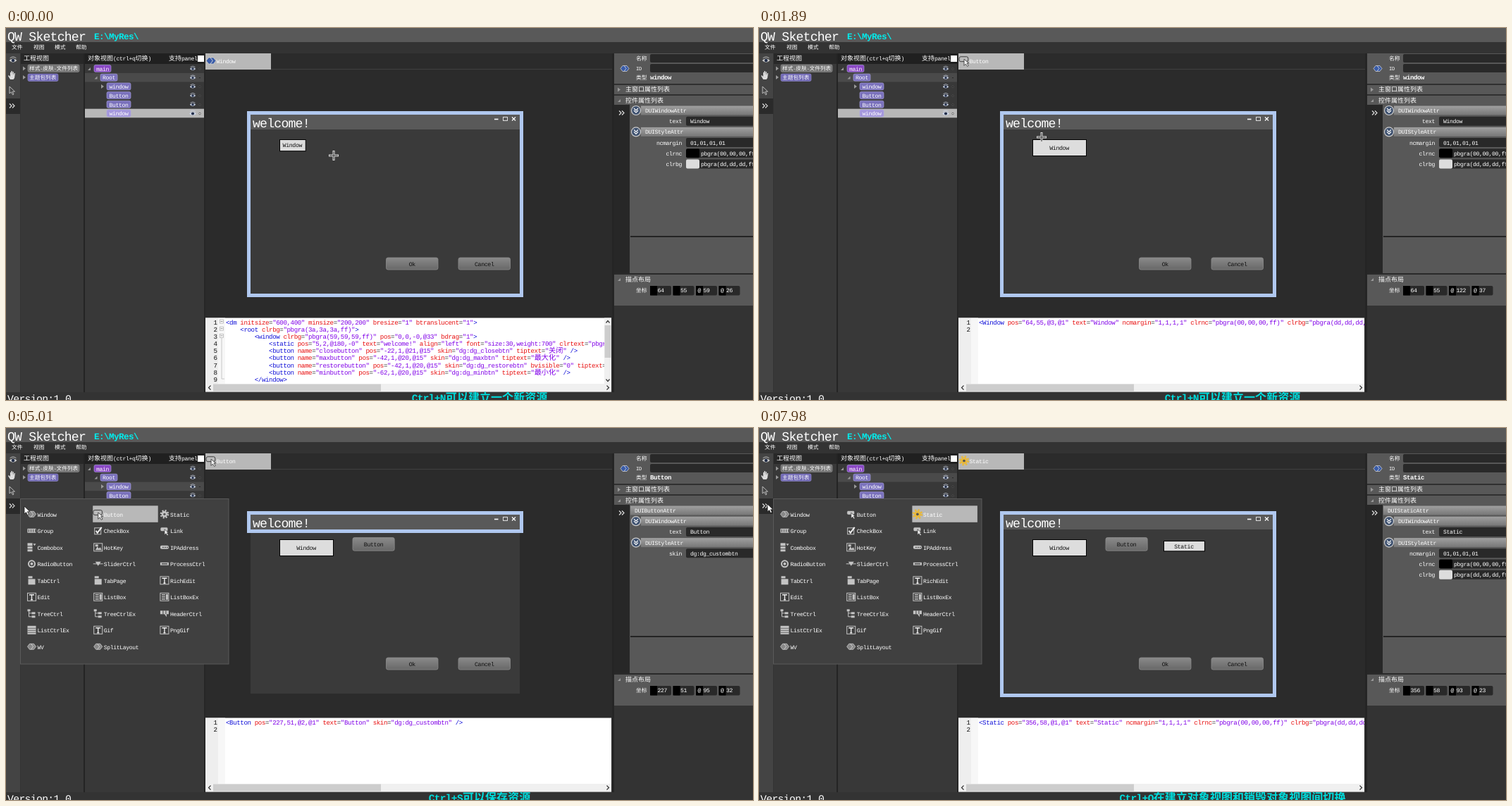
An HTML page for the animation above (8 s loop, 1060x528 px).

```html
<!DOCTYPE html>
<html lang="zh">
<head>
<meta charset="utf-8">
<title>UI designer</title>
<style>
html, body { margin: 0; width: 100%; height: 100%; overflow: hidden; background: #333; }
svg { display: block; }
text {
  font-family: "Liberation Mono", "Noto Sans CJK SC", "Noto Sans CJK", monospace;
  white-space: pre;
  text-rendering: geometricPrecision;
}
</style>
</head>
<body>
<svg id="stage" width="1060" height="528" viewBox="0 0 1060 528">
  <defs>
    <linearGradient id="btn" x2="0" y2="1"><stop stop-color="#8a8a8a"/><stop offset="1" stop-color="#686868"/></linearGradient>
    <linearGradient id="bar" x2="0" y2="1"><stop stop-color="#a0a0a0"/><stop offset="1" stop-color="#777"/></linearGradient>
    <clipPath id="wide"><path d="M283 411H859V505H283z"/></clipPath>
    <clipPath id="slim"><path d="M283 411H849V505H283z"/></clipPath>
  </defs>
  <g id="base"></g>
  <g id="live"></g>
</svg>
<script>
const LOOP = 8000, UNIT = 1.605;

// ---------- drawing helpers ----------
const esc = s => s.replace(/&/g, '&amp;').replace(/</g, '&lt;');
const rect = (x, y, w, h, fill, more = '') =>
  `<rect x="${x}" y="${y}" width="${w}" height="${h}" fill="${fill}" ${more}/>`;
const path = (d, fill, more = '') => `<path d="${d}" fill="${fill}" ${more}/>`;
const line = (d, color, w = 1) => path(d, 'none', `stroke="${color}" stroke-width="${w}"`);
const at = (x, y, body, k = 1) => `<g transform="translate(${x} ${y}) scale(${k})">${body}</g>`;

// u is the width of a half-width cell; CJK glyphs fill two cells
const runs = (s, u, fill) => s.match(/[\u2e80-\uffff]+|[^\u2e80-\uffff]+/g).map(r =>
  r > '\u2e80'
    ? `<tspan font-size="${2 * u}" fill="${fill}">${r}</tspan>`
    : `<tspan font-size="${1.8 * u}" letter-spacing="${-0.08 * u}" fill="${fill}">${esc(r)}</tspan>`).join('');
const text = (x, y, s, u = 4.5, fill = '#fff', more = '') =>
  `<text x="${x}" y="${y + 0.66 * u}" ${more}>${runs(s, u, fill)}</text>`;
const mid = 'text-anchor="middle"', end = 'text-anchor="end"', bold = 'font-weight="bold"';

const field = (x, y, w, s = '', h = 13) =>
  rect(x, y - h / 2, w, h, '#292929', 'rx="2"') + (s ? text(x + 6, y, s) : '');

// ---------- icons, each centred on 0,0 ----------
const box = c => rect(-6, -5.5, 12, 11, 'none', `stroke="${c}"`);
const icons = {
  hex: c => path('M-6 0l3-4h6l3 4l-3 4h-6z', c, 'stroke="#ccc" stroke-width=".8"') + line('M-1-4l3 4l-3 4', '#ddd', .8),
  btn: c => rect(-6, -5, 11, 6, c, 'rx="2" stroke="#333" stroke-width=".8"') + path('M0-2v8l2-2l2 3l1.5-1l-2-3h2.500z', '#eee', 'stroke="#333" stroke-width=".7"'),
  gear: c => `<circle r="5" fill="none" stroke="${c}" stroke-width="2.6" stroke-dasharray="2 1.93"/><circle r="4.2" fill="${c}"/><circle r="1.6" fill="#555"/>`,
  group: c => rect(-6, -3, 12, 6, c) + line('M-4-2v4M-1-2v4M2-2v4M5-2v4', '#444'),
  check: c => rect(-5, -4, 9, 9, 'none', `stroke="${c}"`) + line('M-3 0l2 3l6-8', '#eee', 2),
  combo: c => rect(-6, -6, 7, 4, c) + rect(-6, -1, 7, 3, c) + rect(-6, 3, 7, 3, c) + path('M2-5h4l-2 3z', c),
  key: c => box(c) + path('M-4 4l3-5l2 3l2-2l2 4z', c) + rect(-4, -4, 4, 3, c),
  ip: c => rect(-6, -2.500, 12, 5, c, 'rx="2"') + line('M-3 0h2M0 0h2M3 0h2', '#333'),
  radio: c => `<circle r="4.500" fill="none" stroke="${c}" stroke-width="2"/><circle r="2" fill="${c}"/>`,
  slider: c => line('M-7 0h14', c) + path('M-4-3h8l-4 6z', c),
  proc: c => rect(-6, -2, 12, 4, c) + rect(-4, -.7, 8, 1.4, '#444'),
  tab: c => rect(-5, -6, 6, 3, c) + rect(-5, -2, 10, 8, c),
  edit: c => box(c) + line('M-3.500-3h7M0-3v7M-1.500 4h3', '#eee', 1.4),
  list: c => box(c) + line('M-4-3h5M-4 0h5M-4 3h5', c, 1.4) + rect(2, -4, 3, 8, c),
  tree: c => rect(-6, -6, 4, 3, c) + rect(0, -2, 5, 3, c) + rect(0, 3, 5, 3, c) + line('M-4-3v7.500h4M-4-.5h4', c),
  head: c => path('M-6-4h12v5h-3v4l-3-4h-6z', c) + line('M-2-4v5M2-4v5', '#444'),
  rows: c => rect(-6, -6, 12, 12, c) + line('M-6-2.500h12M-6 .5h12M-6 3.500h12', '#555', .8)
};
const eye = c => path('M-5 0Q0-5 5 0Q0 5-5 0z', c) + '<circle r="2.100" fill="#25304a"/>' + line('M-4-3Q0-6 4-3', c, .8);
const arrow = path('M0 0v11l2.500-2.400l1.900 4l2-1l-1.900-3.800h3.500z', '#fff', 'stroke="#111" stroke-width=".7"');
const cross = line('M-7 0H7M0-7V7', '#ddd', 3) + line('M-6 0H6M0-6V6', '#333');
const right = (x, y) => path(`M${x - 2} ${y - 3}l4 3l-4 3z`, '#999');
const open = (x, y) => path(`M${x + 2} ${y - 2}v4h-4z`, '#999');
const more = (x, y) => line(`M${x - 3} ${y - 3}l3 3l-3 3m4-6l3 3l-3 3`, '#ddd', 1.2);

const palette = ('Window:hex Button:btn Static:gear Group:group CheckBox:check Link:btn Combobox:combo HotKey:key ' +
  'IPAddress:ip RadioButton:radio SliderCtrl:slider ProcessCtrl:proc TabCtrl:tab TabPage:tab RichEdit:edit Edit:edit ' +
  'ListBox:list ListBoxEx:list TreeCtrl:tree TreeCtrlEx:tree HeaderCtrl:head ListCtrlEx:rows Gif:edit PngGif:edit ' +
  'WV:hex SplitLayout:hex').split(' ').map(s => s.split(':'));
const tools = { Window: ['hex', '#3a5ca8'], Button: ['btn', '#bbb'], Static: ['gear', '#e8b93c'] };

// ---------- fixed parts ----------
function base() {
  const menu = ['文件', '视图', '模式', '帮助'].map((s, i) => text([8, 39, 69, 99][i], 27.5, s, 3.9)).join('');
  return rect(0, 0, 1060, 528, '#333') + rect(0, 0, 1060, 20, '#595959') +
    text(2, 11, 'QW Sketcher', 10.1) + text(125, 11, 'E:\\MyRes\\', 7, '#0ee', bold) + menu +
    // tool strip
    rect(0, 36, 20, 481, '#444') + rect(0, 100, 20, 22, '#2a2a2a') + at(10, 46, eye('#ccc'), 1.1) +
    at(9, 67, path('M-3 6l-3-5l1-1l2 2v-6h1.300v4v-6h1.500v6l.7-5h1.300v5l1-3h1.200l-1 7l-1.500 2z', '#ddd')) +
    at(5, 83, path('M0 0v10l2.500-2.200l2 4l1.500-.8l-1.800-3.800h3.300z', 'none', 'stroke="#bbb"')) + more(8, 110.500) +
    // project view
    rect(21, 36, 89, 481, '#383838') + rect(21, 36, 89, 15, '#282828') + text(25, 43.5, '工程视图') +
    rect(110, 36, 2, 481, '#242424') +
    right(26, 57.5) + rect(31, 52, 73, 10.500, '#747474', 'rx="2" stroke="#999" stroke-width=".6"') + text(33, 57.5, '样式-皮肤-文件列表', 3.85) +
    right(26, 70) + rect(31, 65, 43, 10.500, '#6f67b4', 'rx="2" stroke="#9a94d0" stroke-width=".6"') + text(33, 70, '主题包列表', 3.85) +
    // object view
    rect(112, 36, 169, 481, '#383838') + rect(112, 36, 169, 15, '#202020') + text(116, 43.5, '对象视图(ctrl+q切换)') +
    text(231, 43.5, '支持panel') + rect(272, 39, 9, 9, '#fff') +
    // canvas, code frame
    rect(281, 36, 2, 481, '#262626') + rect(283, 36, 577, 375, '#2b2b2b') + rect(376, 58, 484, 1, '#404040') +
    rect(283, 36, 93, 23, '#b8b8b8') +
    rect(283, 411.500, 576, 105, '#fff') + rect(283, 411.500, 18, 94, '#eee') + rect(301, 411.500, 10, 94, '#f7f7f7') +
    rect(283, 505, 576, 11, '#f0f0f0') + rect(294, 505.500, 238, 10, '#cdcdcd') +
    line('M290.500 507.500l-3 3l3 3M852.500 507.500l3 3l-3 3', '#333', 1.2) +
    // property panel
    rect(860, 36, 3, 481, '#252525') + rect(863, 36, 197, 43, '#585858') + at(878, 57.5, icons.hex('#3a5ca8')) +
    text(894, 43, '名称', 3.9) + text(894, 57, 'ID', 4) + text(894, 70, '类型', 3.9) +
    field(914, 43, 150, '', 12) + field(914, 57, 150, '', 12) +
    rect(863, 79, 197, 2, '#303030') + rect(863, 81, 197, 13, '#585858') + right(870, 87.5) + text(879, 87.5, '主窗口属性列表') +
    rect(863, 94, 197, 2, '#303030') + rect(863, 96, 197, 252, '#585858') + open(870, 103) + text(879, 103, '控件属性列表') +
    rect(863, 109, 22, 239, '#272727') + more(873, 120.500) + rect(886, 295, 174, 2, '#242424') +
    rect(863, 348, 197, 2, '#2a2a2a') + rect(863, 350, 197, 44, '#585858') + open(870, 357) + text(879, 357, '描点布局') +
    text(894, 372.5, '坐标', 3.9) +
    text(2, 525.5, 'Version:1.0', 8.2);
}

// ---------- code editor ----------
const tint = s => s[0] === '"' ? '#8000e8' : /[<>\/]/.test(s[0]) ? '#1010d8' : s === '=' ? '#333' : '#e81010';
const code = (s, i) => {
  const toks = s.match(/<\/?\w+|\/?>|"[^"]*"?|=|\w+|\s+/g) || [];
  const y = 417.3 + i * 10.15;
  return `<text x="312" y="${y + 3.4}">${toks.map(k => runs(k, 5.09, tint(k))).join('')}</text>` +
    text(299.5, y, String(i + 1), 5.09, '#111', end);
};
const sysBtn = (name, x, w, more) =>
  ' '.repeat(12) + `<button name="${name}button" pos="${x},1,@${w},@15" skin="dg:dg_${name}btn" ${more} />`;
const doc = [
  '<dm initsize="600,400" minsize="200,200" bresize="1" btranslucent="1">',
  '    <root clrbg="pbgra(3a,3a,3a,ff)">',
  '        <window clrbg="pbgra(59,59,59,ff)" pos="0,0,-0,@33" bdrag="1">',
  '            <static pos="5,2,@180,-0" text="welcome!" align="left" font="size:30,weight:700" clrtext="pbgra(ff,ff,ff,ff)" />',
  sysBtn('close', -22, 21, 'tiptext="关闭"'),
  sysBtn('max', -42, 20, 'tiptext="最大化"'),
  sysBtn('restore', -42, 20, 'bvisible="0" tiptext="还原"'),
  sysBtn('min', -62, 20, 'tiptext="最小化"'),
  '        </window>',
  '        <button pos="-300,-80,@118,@28" skin="dg:dg_custombtn" text="Ok" />'
];
const boxed = 'ncmargin="1,1,1,1" clrnc="pbgra(00,00,00,ff)" clrbg="pbgra(dd,dd,dd,ff)" />';
const snippets = {
  Window: '<Window pos="64,55,@3,@1" text="Window" ' + boxed,
  Button: '<Button pos="227,51,@2,@1" text="Button" skin="dg:dg_custombtn" />',
  Static: '<Static pos="356,58,@1,@1" text="Static" ' + boxed
};
function editor(t) {
  if (t >= 270) {
    const name = t < 3330 ? 'Window' : t < 6850 ? 'Button' : 'Static';
    return `<g clip-path="url(#wide)">${code(snippets[name], 0)}${code('', 1)}</g>`;
  }
  const folds = [0, 1, 2].map(i => {
    const y = 417 + i * 10.15;
    return rect(303.500, y - 3, 5, 5, '#fff', 'stroke="#aaa" stroke-width=".7"') + line(`M304.500 ${y - .5}h3`, '#777', .8);
  }).join('');
  return `<g clip-path="url(#slim)">${doc.map(code).join('')}${folds}${line('M306 440V498h4', '#bbb', .8)}</g>` +
    rect(849, 411.500, 10, 94, '#f0f0f0') + rect(849.500, 422, 9, 46, '#cdcdcd') +
    line('M851.500 418.500l2.500-3l2.500 3M851.500 498.500l2.500 3l2.500-3', '#333', 1.2);
}

// ---------- controls being dragged out ----------
const controls = [
  { name: 'Window', px: 64, py: 55, x: 388, y: 158, from: [59, 26], to: [122, 37], a: 0, b: 120 },
  { name: 'Button', px: 227, py: 51, x: 492, y: 155.5, from: [0, 0], to: [95, 30], label: 32, a: 2550, b: 3000 },
  { name: 'Static', px: 356, py: 58, x: 574, y: 160, from: [0, 0], to: [93, 23], a: 6480, b: 6720 }
];
const sizeOf = (c, t) => {
  const p = Math.min(1, Math.max(0, (t - c.a) / (c.b - c.a)));
  return c.to.map((v, i) => c.from[i] + (v - c.from[i]) * p);
};
const button = (x, y, w, h, s) => rect(x, y, w, h, 'url(#btn)', 'rx="2.500" stroke="#8c8c8c" stroke-width=".8"') +
  text(x + w / 2, y + h / 2 + .3, s, 4.6, '#111', mid);
function control(c, t) {
  const [w, h] = sizeOf(c, t).map(v => v / UNIT);
  if (w < 1) return '';
  if (c.name === 'Button') return button(c.x, c.y, w, h, c.name);
  return rect(c.x + .5, c.y + .5, w, h, '#ddd', 'stroke="#000"') + text(c.x + w / 2, c.y + h / 2 + .3, c.name, 4.6, '#111', mid);
}

function dialog(t, onTitle) {
  const frame = rect(342, 118, 392, onTitle ? 31 : 264, '#b0c8ef');
  return rect(347, 123, 382, 254, '#3a3a3a') + frame +
    (onTitle ? '' : rect(347, 123, 382, 254, '#3a3a3a')) + rect(347, 123, 382, 21, '#595959') +
    text(350, 134.5, 'welcome!', 10.1) +
    line('M693 129.500h5.500', '#fff', 1.6) + rect(705.5, 126.5, 6, 5, 'none', 'stroke="#ddd"') + line('M718 126.500l5 5m0-5l-5 5', '#fff', 1.2) +
    button(539.5, 326, 73.5, 17, 'Ok') + button(642, 326, 73.5, 17, 'Cancel') +
    controls.map(c => t >= c.a ? control(c, t) : '').join('');
}

// ---------- object tree ----------
function tree(t, onTitle) {
  const names = ['main', 'Root', 'window', 'Button', 'Button', 'window'];
  if (t >= 2550) names.push('Button');
  if (t >= 6480) names.push('Static');
  const last = names.length - 1, hover = onTitle ? 2 : 1;
  return names.map((s, i) => {
    const y = 57.5 + i * 12.7, x = [125, 134][i] || 143, w = i < 2 ? 24 : 34, on = i === last;
    const band = on ? '#b8b8b8' : i === hover ? '#4a4a4a' : '';
    return (band ? rect(112, y - 6.3, 169, 12.6, band) : '') +
      rect(x, y - 5, w, 10, i ? on ? '#a497dc' : '#7a71bc' : '#8a48c4', 'rx="2" stroke="#b0a8e4" stroke-width=".6"') +
      text(x + w / 2, y + .3, s, 4.5, '#fff', mid) + at(265, y + .5, eye('#cfd8ea'), on ? 1 : .85) +
      `<circle cx="275" cy="${y + .5}" r="1.300" fill="${on ? '#eee' : '#222'}" stroke="#555" stroke-width=".8"/>`;
  }).join('') + open(118, 58) + open(127.5, 70.5) + right(137, 83);
}

// ---------- property list ----------
function props(t) {
  const c = controls.filter(c => t >= c.a && sizeOf(c, t)[0] > 0).pop();
  const [w, h] = sizeOf(c, t).map(Math.round);
  let y = 117, out = text(914, 70, c.name === 'Window' ? 'window' : c.name, 5, '#fff', bold);
  const next = s => { out += s; y += 15.2; };
  const head = s => next(rect(901, y - 6.5, 160, 13, 'url(#bar)') + text(907, y, s) +
    `<circle cx="894" cy="${y}" r="6.500" fill="#3f5270" stroke="#ccc" stroke-width="1.200"/>` +
    line(`M891 ${y - 3}l3 3l3-3m-6 3l3 3l3-3`, '#fff', 1.2));
  const row = (k, v, color) => next(text(959, y, k, 4.5, '#fff', end) +
    (color ? field(980, y, 84, v) + rect(965, y - 6.5, 19, 13, color, 'rx="2"') : field(965, y, 99, v)));
  if (c.name !== 'Window') next(rect(886, y - 6.5, 175, 13, 'url(#bar)') + text(892, y, `DUI${c.name}Attr`));
  head('DUIWindowAttr');
  row('text', c.name);
  head('DUIStyleAttr');
  if (c.name === 'Button') row('skin', 'dg:dg_custombtn');
  else {
    row('ncmargin', '01,01,01,01');
    row('clrnc', 'pbgra(00,00,00,ff)', '#000');
    row('clrbg', 'pbgra(dd,dd,dd,ff)', '#ddd');
  }
  return out + [c.px, c.py, w, c.label && h === c.to[1] ? c.label : h].map((v, i) => {
    const x = 914 + i * 32.5;
    return rect(x, 366, 30, 13.5, '#292929', 'rx="2"') + rect(x, 366, 10, 13.5, '#000') +
      (i > 1 ? text(x + 2.5, 372.5, '@') : '') + text(x + 10.5, 372.5, String(v));
  }).join('');
}

function popup(tool) {
  return rect(20.5, 100.5, 295.5, 234.5, '#404040', 'stroke="#5a5a5a"') + palette.map(([s, kind], i) => {
    const x = 29 + i % 3 * 94.2, y = 122.3 + Math.floor(i / 3) * 23.5, on = s === tool;
    return (on ? rect(x, y - 12, 92.5, 23.5, '#b8b8b8') : '') +
      at(x + 7.5, y, icons[kind](on ? tools[s][1] : s === 'Window' || kind === 'hex' ? '#888' : '#c4c4c4'), on ? 1.15 : 1) +
      text(x + 15.5, y + .5, s);
  }).join('');
}

// ---------- timeline ----------
const spans = [[120, 1050], [1170, 2130], [2280, 3180], [3330, 4320], [4440, 5400], [5550, 6480], [6600, 7590]];
const steps = [0, ...spans.flatMap(([a, b]) => Array.from({ length: 8 }, (_, i) => Math.round((a + (b - a) * i / 7) / 30) * 30)), 7710, 7860, 7980];

const route = [
  [0, 465, 181], [150, 465, 181], [660, 230, 140], [930, 24, 112], [1050, 11, 110], [1170, 13, 108], [1320, 13, 108],
  [1470, 150, 121], [1590, 155, 121], [1730, 350, 138], [1860, 401, 155], [1900, 401, 155], [2280, 492, 156],
  [2550, 492, 156], [3000, 551, 174], [3180, 551, 172], [3330, 490, 138], [3600, 321, 54], [3900, 240, 42],
  [4320, 125, 98], [4560, 16, 109], [4830, 16, 109], [4980, 26, 111], [5130, 30, 112], [5550, 190, 119],
  [5700, 240, 121], [5820, 240, 121], [6080, 430, 132], [6350, 574, 160], [6480, 591, 167], [6600, 632, 174],
  [6870, 632, 174], [7590, 27, 112], [7710, 13, 108], [8000, 12, 108]
];
function pointer(t) {
  const i = route.findIndex(p => p[0] > t), [t0, x0, y0] = route[i - 1], [t1, x1, y1] = route[i];
  const k = (t - t0) / (t1 - t0);
  return [x0 + (x1 - x0) * k, y0 + (y1 - y0) * k];
}
const within = (t, ...pairs) => pairs.some(([a, b]) => t >= a && t < b);

function scene(t) {
  const onTitle = within(t, [1700, 1850], [3330, 6200]);
  const tool = t < 1600 ? 'Window' : t < 5800 ? 'Button' : 'Static';
  const [kind, color] = tools[tool];
  const tip = t < 2700 ? 'Ctrl+N可以建立一个新资源' : t < 6000 ? 'Ctrl+S可以保存资源' : 'Ctrl+Q在建立对象视图和销毁对象视图间切换';
  const drawing = within(t, [0, 150], [1700, 3200], [6000, 6870]);
  return tree(t, onTitle) + at(291, 46.5, icons[kind](color), 1.15) + text(298.5, 47, tool) +
    dialog(t, onTitle) + editor(t) + props(t) + text(672, 525, tip, 8.03, '#0dd', bold + mid.replace(/^/, ' ')) +
    (within(t, [1050, 1600], [4700, 5800], [7860, LOOP]) ? popup(tool) : '') +
    at(...pointer(t), drawing ? cross : arrow);
}

const $ = id => document.getElementById(id);
const start = performance.now();
let shown = -1;
function tick() {
  const t = (performance.now() - start) % LOOP;
  const step = steps.filter(s => s <= t).pop();
  if (step !== shown) $('live').innerHTML = scene(shown = step);
  requestAnimationFrame(tick);
}
$('base').innerHTML = base();
tick();
</script>
</body>
</html>
```
